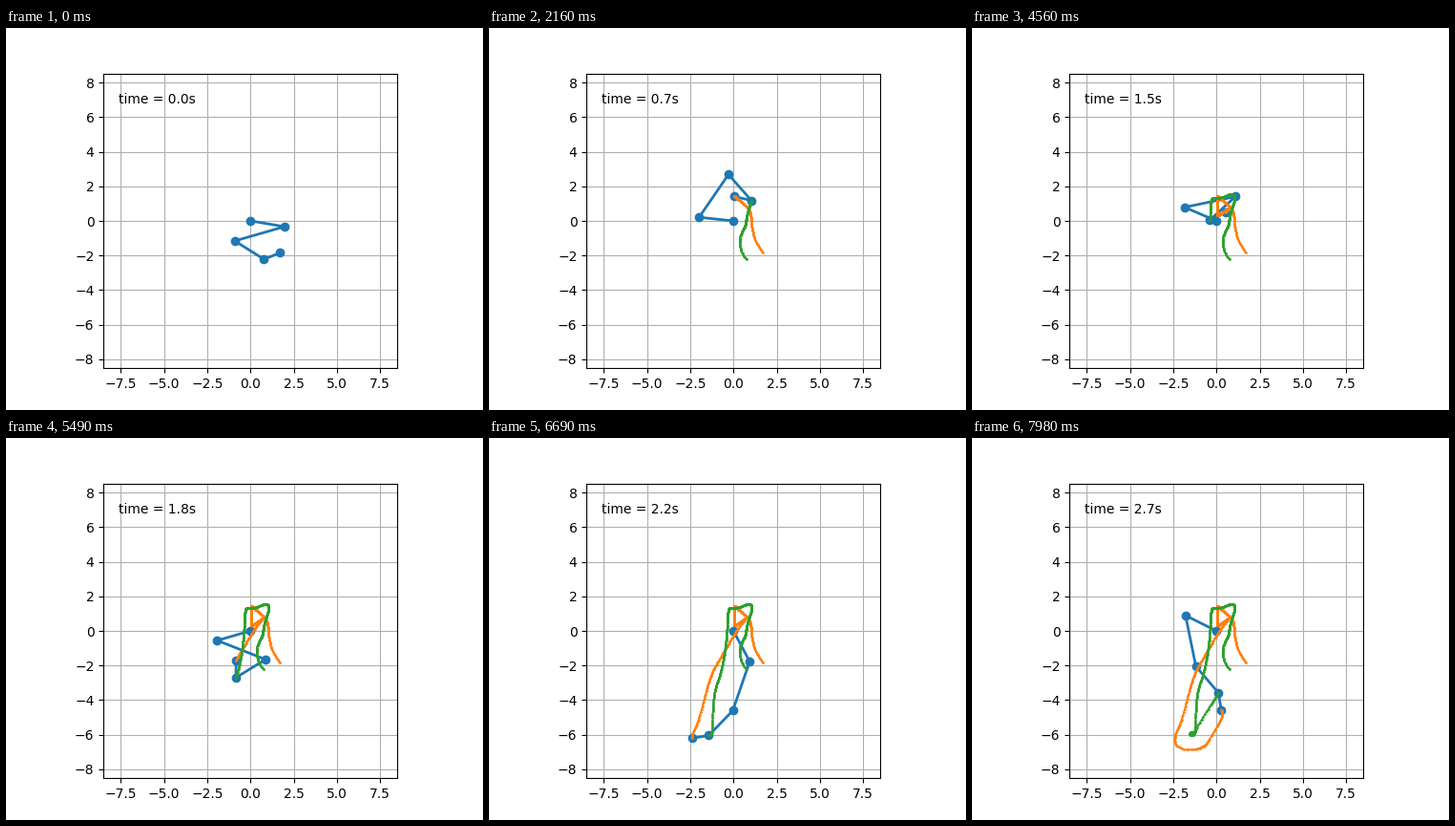
Recreate the animation shown at these times as a matplotlib script. Size 500 px wide and 400 px high, loop 8000 ms.

```python
import numpy as np
import matplotlib.pyplot as plt
from matplotlib.animation import FuncAnimation

LOOP_MS = 8000
TICK_MS = 20      # drawing interval
STEP_MS = 30      # one simulation step stays this long
STEP_TIME = 0.01  # simulated seconds per step
LENGTHS = (2, 3, 2, 1)

# key poses: step, then the clockwise angle of each link in degrees
POSES = np.array([
    (0, 9.5, 164, 32, -22),
    (31, 91.5, 253, 39.5, -70.5),
    (72, 186, 304.5, 48.5, -167),
    (96, 201, 302, 60, -225),
    (120, 215, 317, 111, -292),
    (183, 164, 381.5, 148.5, -450),
    (208, 110, 422, 165, -484),
    (223, 62, 469, 134, -549.5),
    (240, 88, 497.5, 68, -665),
    (253, 160, 458, 35, -673),
    (266, 206.5, 438.5, 49.5, -639.5),
])


def spline(t, keys, values):
    """Natural cubic spline through the columns of values."""
    h = np.diff(keys)
    rate = np.diff(values, axis=0) / h[:, None]
    system = np.eye(len(keys))
    bend = np.zeros_like(values)
    for i in range(1, len(h)):
        system[i, i - 1:i + 2] = h[i - 1], 2 * (h[i - 1] + h[i]), h[i]
        bend[i] = 6 * (rate[i] - rate[i - 1])
    bend = np.linalg.solve(system, bend)

    k = np.clip(np.searchsorted(keys, t, side="right") - 1, 0, len(h) - 1)
    u = ((t - keys[k]) / h[k])[:, None]
    v = 1 - u
    return (v * values[k] + u * values[k + 1]
            + h[k][:, None] ** 2 / 6
            * ((v ** 3 - v) * bend[k] + (u ** 3 - u) * bend[k + 1]))


def joint_paths():
    """Joint coordinates, each of shape (steps, joints)."""
    steps = np.arange(POSES[-1, 0] + 1)
    angles = np.radians(spline(steps, POSES[:, 0], POSES[:, 1:]))
    x = np.cumsum(LENGTHS * np.cos(angles), axis=1)
    y = np.cumsum(-LENGTHS * np.sin(angles), axis=1)
    pivot = ((0, 0), (1, 0))
    return np.pad(x, pivot), np.pad(y, pivot)


LENGTHS = np.array(LENGTHS)
X, Y = joint_paths()

fig = plt.figure(figsize=(5, 4), dpi=100)
ax = fig.add_subplot(autoscale_on=False, xlim=(-8.5, 8.5), ylim=(-8.5, 8.5))
ax.set_aspect("equal")
ax.set_xticks(np.arange(-7.5, 8, 2.5))
ax.set_yticks(np.arange(-8, 9, 2))
ax.grid()

chain, = ax.plot([], [], "o-", lw=2)
trails = {joint: ax.plot([], [], ".-", lw=1, ms=2)[0] for joint in (4, 3)}
clock = ax.text(0.05, 0.9, "", transform=ax.transAxes)


def show(i):
    n = min((i * TICK_MS + TICK_MS // 2) // STEP_MS, len(X) - 1)
    seen = n + 1 if n else 0
    chain.set_data(X[n], Y[n])
    for joint, trail in trails.items():
        trail.set_data(X[:seen, joint], Y[:seen, joint])
    clock.set_text(f"time = {n * STEP_TIME:.1f}s")
    return chain, *trails.values(), clock


def reset():
    return show(0)


anim = FuncAnimation(fig, show, frames=LOOP_MS // TICK_MS, init_func=reset,
                     interval=TICK_MS, repeat=True, repeat_delay=0)
plt.show()
```
